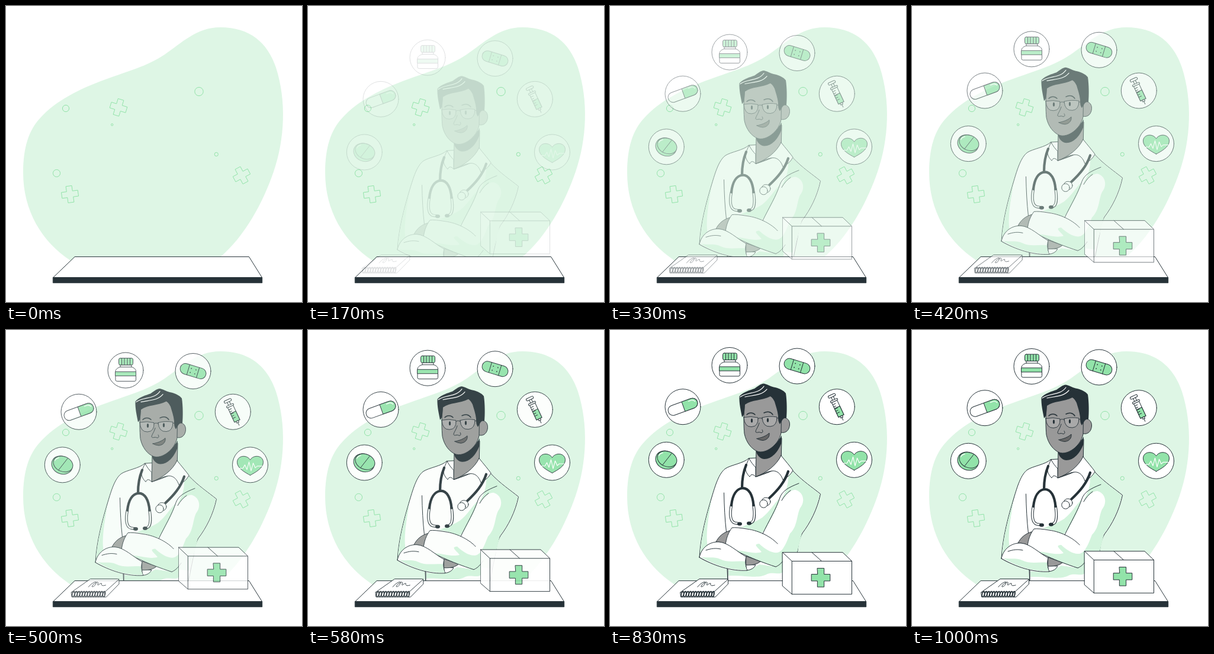
Recreate the animation shown at these times as an HTML page. Size 500 px wide and 500 px high, loop 1.04 s.

```html
<!DOCTYPE html>
<html lang="en">
<head>
<meta charset="utf-8">
<title>Doctor at the desk</title>
<style>
  html, body { margin: 0; width: 100%; height: 100%; overflow: hidden; background: #fff; }
  svg { display: block; width: 100vw; height: 100vh; }
  .ln { stroke: #263238; stroke-width: 1; stroke-linecap: round; stroke-linejoin: round; fill: none; }
  .w { fill: #fff; }
  .g { fill: #92e3a9; }
  .s { fill: #999; }
  .d { fill: #263238; }
  .pale { fill: #d3f4dd; }
  .hi { fill: none; stroke: #fff; stroke-width: 1.2; stroke-linecap: round; stroke-linejoin: round; }
  .tube { fill: none; stroke: #263238; stroke-width: 4.2; stroke-linecap: round; }
  .faint { fill: none; stroke: #92e3a9; stroke-width: 1; }
</style>
</head>
<body>
<svg viewBox="0 0 500 500">
  <defs>
    <path id="plus" d="M-5-14H5V-5H14V5H5V14H-5V5H-14V-5H-5Z" vector-effect="non-scaling-stroke"/>
    <circle id="disc" r="30" class="ln w"/>
  </defs>

  <path fill="#def6e5" d="M362 36C412 36 442 62 456 104C474 160 471 225 452 280C434 332 404 388 362 424L340 440H124L109 430C60 398 29 345 29 282C29 240 38 210 58 189C84 160 124 140 168 124C206 110 238 102 268 82C296 63 322 36 362 36Z"/>
  <g class="faint">
    <use href="#plus" transform="translate(190 171.300) rotate(17)"/>
    <use href="#plus" transform="translate(108 318) rotate(-8)"/>
    <use href="#plus" transform="translate(398 286) rotate(-28)"/>
    <circle cx="101" cy="173" r="5.6"/>
    <circle cx="326" cy="144.5" r="7.2"/>
    <circle cx="355.3" cy="250.5" r="3.1"/>
    <circle cx="179.2" cy="200.5" r="1.7"/>
    <circle cx="85.5" cy="282.5" r="6.1"/>
  </g>

  <!-- icons -->
  <g data-from="0 30">
    <g transform="translate(202 61.500)">
      <use href="#disc"/>
      <path class="ln w" d="M-9-9H10V-5.500C14-4.500 17.500-2 17.500 2V16Q17.500 18.500 15 18.500H-14.500Q-17 18.500-17 16V2C-17-2-13-4.500-9-5.500Z"/>
      <path class="ln g" d="M-17 2.500H17.500V9.500H-17Z"/>
      <rect class="ln g" x="-11.500" y="-20.500" width="24" height="11.500" rx="2.500"/>
      <path class="ln" d="M-6.500-20V-9.500M-2-20V-9.500M3-20V-9.500M7.500-20V-9.500M-9-5.500H10"/>
    </g>
  </g>
  <g data-from="0 30">
    <g transform="translate(316 63)">
      <use href="#disc"/>
      <g transform="rotate(17)">
        <rect class="ln g" x="-22.500" y="-9" width="45" height="18" rx="9"/>
        <path class="ln" d="M-8.500-9V9M8.500-9V9"/>
        <path class="ln" stroke-dasharray="0 7" style="stroke-width:1.800" d="M-4-3.500V4M4-3.500V4"/>
      </g>
    </g>
  </g>
  <g data-from="0 30">
    <g transform="translate(123 131.700)">
      <use href="#disc"/>
      <g transform="rotate(-20)">
        <rect class="ln w" x="-26" y="-8.500" width="52" height="17" rx="8.500"/>
        <path class="ln g" d="M1-8.500H17.500A8.500 8.500 0 0 1 17.500 8.500H1Z"/>
        <path class="hi" d="M12-5.500H17Q21-5 22.500-1.500"/>
      </g>
    </g>
  </g>
  <g data-from="0 30">
    <g transform="translate(383.300 131.700)">
      <use href="#disc"/>
      <g transform="rotate(-25)">
        <rect class="ln w" x="-2" y="-20" width="4" height="12"/>
        <rect class="ln w" x="-6.500" y="-22.500" width="13" height="4" rx="2"/>
        <rect class="ln w" x="-5" y="-11" width="10" height="28"/>
        <rect class="ln g" x="-5" y="1" width="10" height="16"/>
        <rect class="ln w" x="-6.500" y="-13" width="13" height="3" rx="1.500"/>
        <rect class="ln w" x="-2" y="17" width="4" height="3"/>
        <path class="ln" d="M0 20V25M-5-6H0M-5-2H-1M-5 2H0M-5 6H-1M-5 10H0"/>
      </g>
    </g>
  </g>
  <g data-from="0 30">
    <g transform="translate(95.300 221.300)">
      <use href="#disc"/>
      <g transform="rotate(22)">
        <ellipse class="ln g" cx="-.5" cy=".5" rx="18" ry="15"/>
        <ellipse class="ln g" cx=".5" cy="-1.800" rx="17" ry="12.700"/>
      </g>
      <path class="ln" d="M-6 8L8.500-10.500"/>
      <path class="hi" d="M-13-7Q-11-11-6-12"/>
    </g>
  </g>
  <g data-from="0 30">
    <g transform="translate(412.500 221.300)">
      <use href="#disc"/>
      <path class="ln g" d="M0 17.500C-8 13-22 6-22-4.500C-22-16-6-18 0-8.500C6-18 22-16 22-4.500C22 6 8 13 0 17.500Z"/>
      <path class="hi" d="M-20 6L-12 5.500L-9 0L-5.500 8L-2-5L1.500 10L5-3L8.500 5L12 2H20"/>
    </g>
  </g>

  <!-- doctor -->
  <g data-from="0 30">
    <path class="ln w" d="M234 219C226 227 204 230 195 236C184 244 178 264 172 284C163 314 153 350 151 386C162 393 180 400 198 404L199 432H306L310 408L317 374C318 364 320 354 325 345C338 328 350 305 355.500 279C342 268 325 257 309 240L289 216Z"/>
    <path class="pale" d="M171.500 288C163 316 153.500 350 151.500 385L166 372C160 350 167 316 171.500 288Z"/>
    <path class="pale" d="M301 246L309 241C325 258 342 268 354.500 279.500C349 305 337 328 324 345L317 374L309 400L292 398C296 380 302 362 304 346C317 333 315 316 321 303C331 291 326 275 313 272C303 272 296 282 289 289C297 276 302 262 301 246Z"/>
    <path class="pale" d="M221 335C232 331 246 326 257 319C270 309 276 296 286 287C282 305 272 320 265 334C260 342 257 347 250 343C240 338 229 336 221 335Z"/>
    <path class="pale" d="M200 407C220 411 240 406 252 398L282 402L293 392V410C286 417 276 410 266 414C250 423 232 416 200 417Z"/>
    <path class="ln" d="M192.500 277C193 300 194 322 196.500 343M319 261C301 268 291 274 287 285C281 304 268 325 258 346M290 290C294 283 299 277 305 273M199 404V424"/>

    <path class="ln s" d="M179 360C184 350 192 343 206 340L198 366C192 361 186 360 179 360Z"/>
    <path class="ln w" d="M230 398L246 399Q242 407 231 408Z"/>
    <path class="ln s" d="M230 384L254 393C249 397 243 399.500 230 399Z"/>
    <path class="w" d="M206 336C222 335 246 340 268 352L292 345L304 346C302 370 292 397 280 402C240 389 215 376 195 366C196 354 200 344 206 336Z"/>
    <path class="pale" d="M213 374C228 375 244 381 256 377C249 368 241 364 252 363C264 374 280 384 290 374C296 367 300 356 304 346L322 346C306 372 294 397 280 402C250 393 228 382 213 374Z"/>
    <path class="ln" d="M283 363C274 353 254 341 231 338Q214 335 206 336C200 344 196 354 195 366C215 376 240 389 280 402C287 399 291 394 296 387"/>
    <path class="ln w" d="M151 386C154 370 168 359 184 360C200 361 215 377 230 385C228 392 228 400 232 408C205 410 175 400 151 386Z"/>
    <path class="pale" d="M153 385C164 388 176 384 186 389C200 396 216 391 228 393Q228 401 231 407C205 409 176 399 153 385Z"/>
    <path class="ln" d="M162 374C171 371 178 370 187 372"/>

    <!-- neck and collar -->
    <path class="ln s" d="M247 204L246 250C260 246 279 238 289 233L290 185Z"/>
    <path class="d" d="M246 203C262 208 279 201 290 180L289.500 193C284 208 273 220 261 220C254 220 249 214 247 208Z"/>
    <path class="ln w" d="M235 219C232 224 230 230 229 236C229 241 232 246 236 250C238 245 242 245 246 250V234C242 230 238 225 235 219Z"/>
    <path class="ln w" d="M289 214C297 224 304 232 309 239C305 247 299 251 292 255C289 246 283 239 274 240C264 241 256 247 246 250C264 243 281 231 289 214Z"/>

    <!-- head -->
    <path class="ln s" d="M287 154C292 147 304 150 303.500 162C303 171 297 177 289 175Z"/>
    <path class="ln s" d="M228 122C225 145 226 166 227 177C230 192 239 203 249 207C263 212 285 196 289 176L290 125L262 108Z"/>
    <path class="d" d="M223 149C221 138 218 126 218.500 114C226 106 236 104 244 101C250 97 254 93 260 92.500C267 94 272 98 279 99C287 101 293 104 297 109C299 122 299 140 298 151C296 150 292 151 290 156L287 161C284 157 284 152 284 147C283 138 280 130 278 123C276 119 274 116 271 114C256 122 240 119 228 128C227 136 228 146 223 149Z"/>
    <path class="hi" d="M220 115C232 106 250 111 260 97M228 115C241 112 256 113 265 102"/>
    <path class="ln" style="stroke-width:1.500" d="M231 145C235 141 241 141 245 145M260 142C266 139 272 140 275 145"/>
    <g class="ln" style="fill:#ffffff2a;stroke-width:.9">
      <path d="M226 149.500Q238 147 250 150Q251 165 239 165.500Q227 166 226 149.500Z"/>
      <path d="M257 150Q269 146.500 282 149Q282 164 271 165Q258 166 257 150Z"/>
      <path d="M250 152Q253.500 149 257 152M282 151L291 150" fill="none"/>
    </g>
    <ellipse class="d" cx="239.500" cy="155" rx="1.600" ry="3.500"/>
    <ellipse class="d" cx="266.500" cy="154.300" rx="1.600" ry="3.500"/>
    <path class="ln" d="M252 159C250 167 246 170 246 174C248 177 251 173 255 175.500C258 176 259 173 257 170.500"/>
    <path class="ln" style="fill:#666" d="M248 185.500C256 184 264 181 269 176C270 183 265 188 258 188.500Q252 188 248 185.500Z"/>

    <!-- stethoscope -->
    <path class="tube" d="M230 230C225 242 223 254 223 269M301 241C295 259 284 272 269 286"/>
    <path class="ln" style="stroke-width:4.600" d="M205 298C202 313 203 326 211 328L217 329M242.500 298C245 313 244 325 239 327"/>
    <path class="hi" style="stroke-width:2.600" d="M205 298C202 313 203 326 211 328L215 328.500M242.500 298C245 313 244 325 239 327"/>
    <path class="tube" d="M205 298C207 280 214 270 224 269C235 269 241 281 242.500 298"/>
    <ellipse class="d" cx="219" cy="329.500" rx="4" ry="3"/>
    <ellipse class="d" cx="235" cy="328.500" rx="4" ry="3"/>
    <ellipse class="ln w" cx="263.500" cy="292" rx="7.500" ry="7"/>
    <circle class="ln w" cx="259.500" cy="295.500" r="6.700"/>
  </g>

  <!-- table -->
  <path class="ln w" d="M116.500 423.600H410.500L432.500 458.700H80Z"/>
  <path class="ln d" d="M79.700 458.700H432.700V467.700H79.700Z"/>

  <!-- first aid box -->
  <g data-from="0 -30">
    <path class="ln w" d="M291.500 373.700H393L408.500 388.500V444.300H307.300L291.500 430.500Z"/>
    <path class="ln" d="M291.500 373.700L307.300 388.500V444.300M307.300 388.500H408.500M341 373.700L357.500 388.500"/>
    <use href="#plus" class="ln g" transform="translate(356 416.300) scale(1.130)"/>
  </g>

  <!-- notepad -->
  <g data-from="-30 0">
    <path class="ln w" d="M117 443L149 420.500H195Q198 420 197.500 423V429L176 451H118Z"/>
    <path class="ln" d="M117 443H173L197.500 421M173 443V451"/>
    <path class="ln" d="M146 434C150 428 160 423 159 427C157 434 149 436 153 431C158 426 163 424 162 428C160 435 165 427 168 428C167 433 171 432 175 431"/>
    <g id="rings" class="ln" style="stroke-width:1.500"></g>
  </g>
</svg>
<script>
  const LOOP = 1040, STEPS = 24, STEP = 1000 / STEPS;
  const parts = [...document.querySelectorAll('[data-from]')].map(el => ({
    el, from: el.dataset.from.split(' ').map(Number)
  }));

  const rings = document.getElementById('rings');
  for (let i = 0; i < 13; i++) {
    const ring = document.createElementNS('http://www.w3.org/2000/svg', 'ellipse');
    ring.setAttribute('rx', 1.9);
    ring.setAttribute('ry', 4.6);
    ring.setAttribute('transform', `translate(${120.5 + i * 4.3} 446) rotate(12)`);
    rings.append(ring);
  }

  const bez = (u, a, b) => 3 * (1 - u) ** 2 * u * a + 3 * (1 - u) * u * u * b + u ** 3;

  // cubic-bezier(.36, -.01, .5, 1.38)
  function ease(x) {
    let lo = 0, hi = 1;
    for (let i = 0; i < 30; i++) {
      const mid = (lo + hi) / 2;
      if (bez(mid, .36, .5) < x) lo = mid; else hi = mid;
    }
    return bez(hi, -.01, 1.38);
  }

  function draw(ms) {
    const step = Math.min(STEPS, Math.floor((ms + 3.5) / STEP));
    const p = ease((step + 1) / (STEPS + 1));
    for (const { el, from: [x, y] } of parts) {
      el.style.opacity = step < 2 ? 0 : Math.min(1, p);
      el.setAttribute('transform', `translate(${x * (1 - p)} ${y * (1 - p)})`);
    }
  }

  const start = performance.now();
  function tick() {
    draw((performance.now() - start) % LOOP);
    requestAnimationFrame(tick);
  }
  tick();
</script>
</body>
</html>
```
